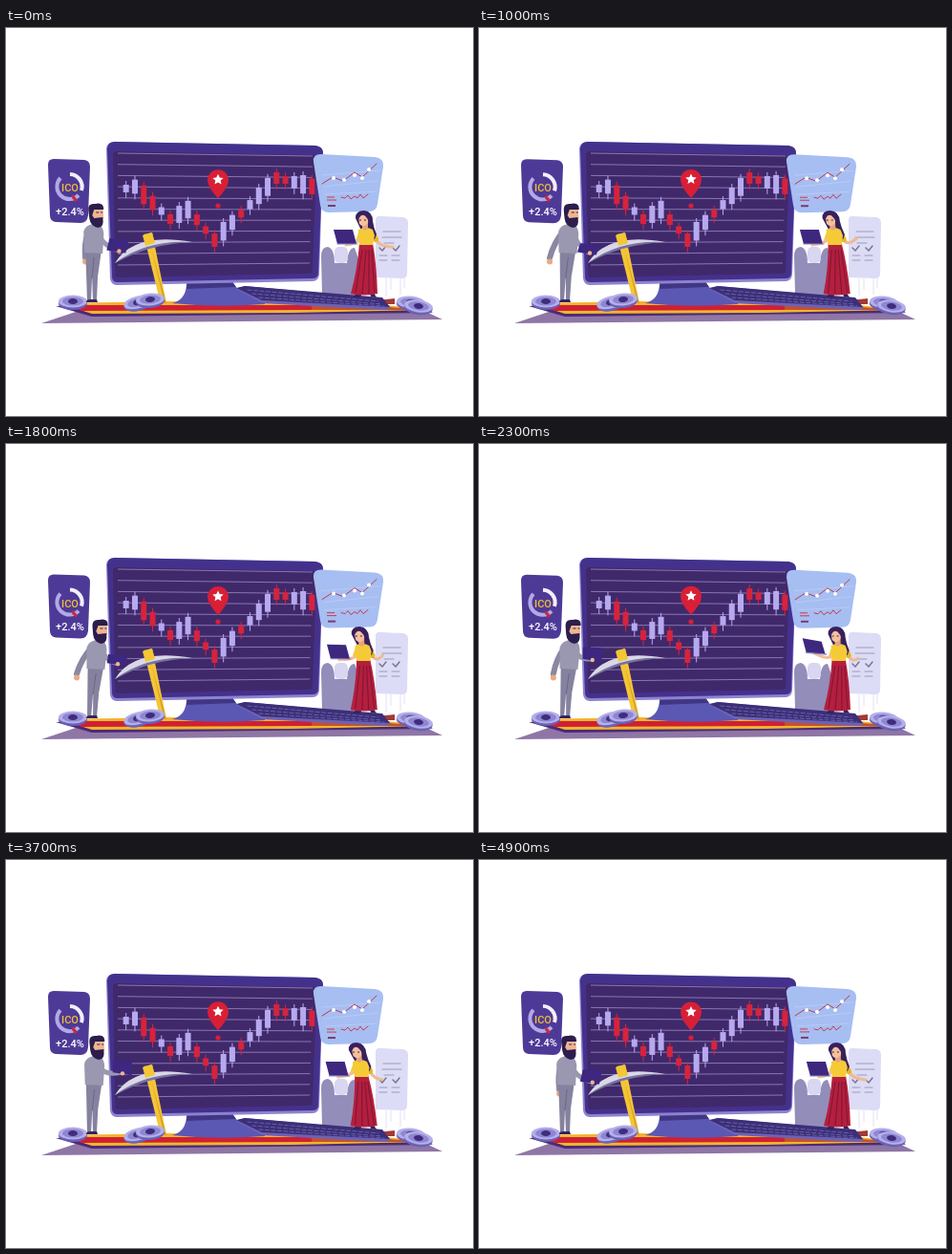
An HTML page for the animation above (5000 ms loop, 489 px wide and 406 px high).

```html
<!DOCTYPE html>
<html lang="en">
<head>
<meta charset="utf-8">
<style>
html,body{margin:0;width:100%;height:100%;overflow:hidden;background:#fff}
svg{display:block;width:489px;height:406px}
text{font:500 11px Roboto,"Open Sans",sans-serif;font-stretch:75%;text-anchor:middle}
.l{fill:none;stroke-linecap:round;stroke-linejoin:round}
</style>
</head>
<body>
<svg viewBox="0 0 489 406">
<!-- ground -->
<path d="M37 309L76 296 440 297 457 305Z" fill="#8f76a5"/>
<path d="M52 291L90 302 447 298 436 293 320 288Z" fill="#4a2a78"/>
<path d="M56 288L170 286 400 290 440 295 300 298 90 299Z" fill="#f2b52e"/>
<path d="M54 290L320 290V295L80 296Z" fill="#cf2034"/>
<path d="M320 290L400 292 440 295 320 295Z" fill="#c5512e"/>

<!-- armchair and checklist -->
<path d="M387 200Q388 196 393 197L416 198Q421 199 421 204L420 257Q420 262 415 262L387 261Z" fill="#dcdcf6"/>
<path class="l" d="M395 213H413M394 219H414M396 225H406M391 238H399M404 238H412M391 243H399M404 243H412" stroke="#9e9bb5"/>
<path class="l" d="M391 230l3 3 4-5M405 230l3 3 4-5" stroke="#77728f" stroke-width="1.4"/>
<path d="M398 262v19M403 262v12M413 262v17M417 262v10" stroke="#e2e0f3"/>
<path d="M331 278L330 239Q330 229 337 229 344 231 344 246L357 246Q358 230 365 230L370 244V282Z" fill="#938dba"/>
<rect x="344" y="229" width="14" height="17" rx="5" fill="#d9d6f1"/>
<path d="M388 285L407 283V289L388 289Z" fill="#a23a36"/>

<!-- monitor -->
<path d="M189 264H237Q239 277 271 284V289Q220 293 174 288 190 284 189 264Z" fill="#5b58b4"/>
<path d="M190 264H236L241 271 189 273Z" fill="#403683"/>
<path d="M105 126Q106 119 114 119L324 123Q332 124 332 131L328 258Q327 265 321 265L116 269Q110 269 109 262Z" fill="#8d82cf"/>
<path d="M106 126Q107 119 114 119L324 123Q332 124 332 131L327 256Q327 262 321 262L117 266Q111 266 111 260Z" fill="#44318c"/>
<path d="M112 132Q112 129 116 129L320 133Q325 133 325 137L321 254Q321 257 317 257L117 261Q114 261 114 257Z" fill="#40296b"/>
<g id="chart"></g>
<g id="pin">
<path d="M222 179Q211 167 211 160A11 11 0 0 1 233 160Q233 167 222 179Z" fill="#d81f36"/>
<path d="M222 153.500l1.700 3.600 4 .5-3 2.700.8 3.900-3.500-2-3.500 2 .8-3.900-3-2.700 4-.5Z" fill="#fff"/>
</g>
<circle cx="222" cy="186" r="2.600" fill="#d81f36"/>

<!-- keyboard -->
<path d="M241 273L250 270 394 283 403 293 396 295 268 288Z" fill="#6a62b4"/>
<path d="M241 272L250 270 394 282 402 292 268 285Z" fill="#3c2f78"/>
<path class="l" d="M253 274L390 286M258 278L394 289M265 282L396 291" stroke="#665fa9" stroke-dasharray="4 2.500"/>

<!-- floating panels -->
<g id="gauge">
<path d="M44 143Q44 137 50 137L82 138Q88 139 88 145L86 196Q85 204 78 204L52 203Q46 202 46 196Z" fill="#4d3a97"/>
<path class="l" d="M57 157A13 13 0 1 0 76 175" stroke="#b3a9e6" stroke-width="4" style="stroke-linecap:butt"/>
<path class="l" d="M67 153A13 13 0 0 1 79 170" stroke="#f1effb" stroke-width="4" style="stroke-linecap:butt"/>
<path d="M70 174l5 6-2 2-4-4Z" fill="#c9283c"/>
<text x="67" y="171" fill="#f5bd32">ICO</text>
<text x="67" y="195.500" fill="#fff">+2.4%</text>
</g>
<g id="graph">
<path d="M322 140Q321 132 330 132L386 135Q396 136 395 145L389 184Q388 192 380 192L338 193Q330 193 329 185Z" fill="#a6bef2"/>
<path d="M333 174L388 171M332 166L390 160M330 154L392 149" stroke="#bfd0f7" stroke-width=".7"/>
<path class="l" d="M331 163L342 156 353 160 365 151 373 156 388 142" stroke="#bd3a52"/>
<g fill="#fff"><circle cx="343" cy="157" r="2"/><circle cx="354" cy="159" r="2"/><circle cx="365" cy="154" r="2"/><circle cx="373" cy="157" r="2"/><circle cx="380" cy="148" r="2"/></g>
<path class="l" d="M351 177l4 1 3-3 3 4 4-3 3 2 3-4 3 4 5-4" stroke="#c93c50"/>
<path d="M336 177h8M336 180h10" stroke="#c93c50"/>
<path d="M337 186h8" stroke="#7a3c6a" stroke-width="2"/>
</g>

<!-- pickaxe -->
<path d="M144 216L153 214 168 288 162 289Z" fill="#f4c535"/>
<path d="M152 230L168 288 166 288Z" fill="#d89a2b"/>
<path d="M114 246Q134 213 195 224 150 224 114 246Z" fill="#d9d7e8"/>
<path d="M114 246Q147 221 195 224 150 226 114 246Z" fill="#77729c"/>
<path d="M143 217L153 214 156 225 146 228Z" fill="#f4c535"/>
<g id="coins"></g>

<!-- man -->
<path id="backArm" class="l" stroke="#8a87a2" stroke-width="6"/>
<circle id="backHand" r="3" fill="#e9a983"/>
<g id="man">
<path d="M83 231H100L96 260 95 285H91L90 260 89 286H85Z" fill="#85829f"/>
<path d="M92 240L90 262" stroke="#6b6886"/>
<path d="M84 287q0-3 4-3h7l1 3Z" fill="#33245f"/>
<path d="M81 213Q83 206 91 205L98 206Q103 210 102 219L101 236 82 235Z" fill="#9a97b0"/>
<path d="M88 189H101L102 199 99 204H89Z" fill="#f0b592"/>
<path d="M86 191Q85 183 93 184 102 182 102 190L92 190 90 196 92 199 101 198Q103 209 96 209 88 207 87 199Z" fill="#2c1d4c"/>
<path d="M94 193h3M99 193h2" stroke="#2c1d4c"/>
</g>
<path id="frontArm" class="l" stroke="#9a97b0" stroke-width="5"/>
<path id="book" fill="#3d2780"/>
<circle id="frontHand" r="2.200" fill="#efb48e"/>

<!-- woman -->
<path id="farArm" class="l" stroke="#eebb91" stroke-width="3"/>
<path id="farSleeve" class="l" stroke="#e5b52a" stroke-width="6"/>
<g id="woman">
<path d="M366 199Q366 191 375 191 384 192 384 202 385 209 388 216L386 221 374 216Z" fill="#38205f"/>
<path d="M367 277l-3 5h7l2-5M381 277l1 4 6 1-3-5" fill="#38205f"/>
<path d="M370 225H384Q388 246 389 278 374 281 361 278 368 253 370 225Z" fill="#b41f3e"/>
<path d="M373 232L366 277M377 232L373 278M380 232L380 278M383 232L386 277" stroke="#861536" stroke-width="1.200"/>
<path d="M369 211Q377 207 384 211L386 217 384 227H370Z" fill="#f4cb37"/>
<path d="M373 204h6v6l-3 2-3-2Z" fill="#e3a480"/>
<path d="M369 197Q374 194 380 198L379 204Q375 210 370 205Z" fill="#f5c09b"/>
<path d="M367 199Q368 191 376 192 383 194 383 203L380 206Q380 199 374 195 371 196 369 200Z" fill="#38205f"/>
<path d="M370 201h2M375 201h2" stroke="#38205f"/>
</g>
<path id="nearSleeve" class="l" stroke="#f4cb37" stroke-width="5"/>
<path id="nearArm" class="l" stroke="#f2be98" stroke-width="3"/>
<path id="laptop" fill="#3e287e"/>
<path id="laptopBase" class="l" stroke="#8a82c8" stroke-width="1.200"/>
</svg>
<script>
const LOOP = 5000;
const $ = id => document.getElementById(id);
const set = (id, attrs) => { for (const k in attrs) $(id).setAttribute(k, attrs[k]); };
const line = (id, ...p) => set(id, {d: 'M' + p.join(' ')});
const quad = (id, ...p) => line(id, ...p, 'Z');
const shift = (id, y) => set(id, {transform: `translate(0 ${y})`});

// candles follow a price path through a few turning points
const turns = [[0, 168], [1, 166], [5, 200], [7, 190], [10, 222], [17, 157], [22, 168]];
const price = i => {
  const k = turns.findIndex(p => p[0] > i), [x0, y0] = turns[k - 1], [x1, y1] = turns[k];
  return y0 + (y1 - y0) * (i - x0) / (x1 - x0);
};
const grid = Array.from({length: 11}, (_, i) =>
  `<path d="M117 ${131 + i * 11.7}L${321 - i * .3} ${134 + i * 11.2}" stroke="#9a8cc0" stroke-width=".8"/>`);
const candles = [...'LLRRLRLLRRRLLRLLLRRLLR'].map((side, i) => {
  const x = 125.7 + i * 9.27, h = 13.500 + 6 * Math.cos((i - 2) * 1.38), y = price(i) - h / 2;
  const color = side == 'R' ? '#d7233c' : '#b6a9f0';
  return `<path d="M${x} ${y - 4}v${h + 10}" stroke="${color}"/>
    <rect x="${x - 3}" y="${y}" width="6" height="${h}" fill="${color}"/>`;
});
$('chart').innerHTML = [...grid, ...candles].join('');

const coin = (x, y, tilt) =>
  `<g transform="translate(${x} ${y}) rotate(${tilt})"><ellipse cy="2" rx="15" ry="7" fill="#6862b8"/>
  <ellipse rx="15" ry="6.500" fill="#b5afea"/><ellipse rx="11" ry="4.500" fill="#8d86d2"/>
  <ellipse rx="5" ry="3" fill="#3f2d7b"/></g>`;
$('coins').innerHTML = coin(70, 286, 0) + coin(138, 287, -14) + coin(151, 284, -5) + coin(424, 287, 5) + coin(432, 291, 8);

// cosine peaking at time `peak`, n times per loop
const wave = (t, peak, n = 1) => Math.cos((t - peak) / LOOP * 2 * Math.PI * n);
// smooth bump around `mid`
const bump = (t, mid, width) => Math.exp(-(((t - mid) / width) ** 2));
// shear a standing figure so that its head shifts by dx
const lean = (id, dx, head, foot) => {
  const c = dx / (head - foot);
  set(id, {transform: `matrix(1 0 ${c} 1 ${-c * foot} 0)`});
};

function drawMan(t) {
  const dx = 2.3 + 2.3 * wave(t, 2100), sx = 86 + dx * .8;
  lean('man', dx, 193, 287);

  const hx = 81.500 - 8.500 * wave(t, 1400), hy = 244.500;
  line('backArm', sx, 213, 'Q', (sx + hx) / 2 - 3, 225, hx, hy - 4);
  set('backHand', {cx: hx, cy: hy});

  const h = 14.500 - 8.500 * bump(t, 1400, 400), slant = -1.500 - 2 * wave(t, 500);
  const x = 109 - 3 * wave(t, 1100), bottom = 230 + 7 * wave(t, 700), top = bottom - h;
  line('frontArm', sx + 11, 213, 'Q', 98 + dx, 226, x + 8, bottom - 2);
  quad('book', x, top, x + 20, top + 1, x + 20 + slant, bottom + 1, x + slant, bottom - 2);
  set('frontHand', {cx: x + 10, cy: bottom - 1});
}

function drawWoman(t) {
  const dx = -3.500 + 3.500 * wave(t, 0, 2), x = dx * .85;
  lean('woman', dx, 200, 281);

  const wx = 401 + 4 * wave(t, 0) + dx, wy = 230 - 12 * bump(t, 1300, 800) - 4 * bump(t, 2600, 600);
  line('farSleeve', 383 + x, 213, 'L', 387 + x, 221);
  line('farArm', 387 + x, 221, 'Q', 391 + x, 229, wx, wy);

  const lift = bump(t, 2500, 500), tilt = 4 * lift;
  const lx = 341 + 2 * wave(t, 0) + dx * .9, ly = 211 - 9 * lift;
  line('nearSleeve', 372 + x, 213, 'L', 369 + x, 222);
  line('nearArm', 369 + x, 222, 'Q', 366 + x, 226, lx + 13, ly + 16);
  quad('laptop', lx, ly, lx + 20, ly + tilt, lx + 24, ly + 15 + tilt / 2, lx + 4, ly + 15);
  line('laptopBase', lx + 4, ly + 15, 'L', lx + 25, ly + 15 + tilt / 2);
}

function frame(now) {
  const t = Math.floor(now % LOOP / 100) * 100;
  const bob = wave(t, 625, 2);
  shift('gauge', .5 * bob);
  shift('graph', .4 * bob);
  shift('pin', -.7 - .7 * bob);
  drawMan(t);
  drawWoman(t);
  requestAnimationFrame(frame);
}
frame(0);
</script>
</body>
</html>
```
